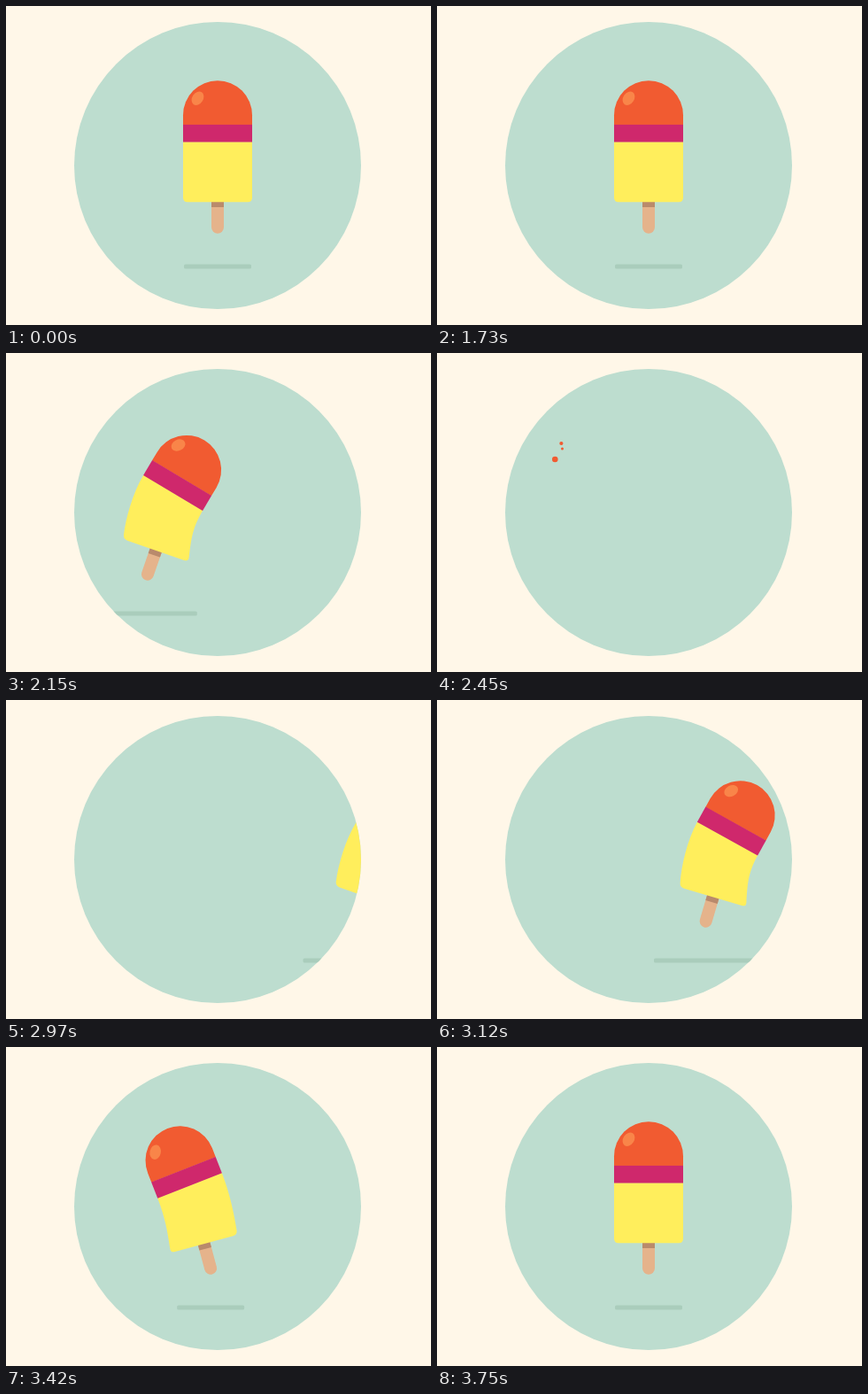
Write an HTML page with a canvas that moves like this. It is 480 px wide and 360 px high and loops after 3840 ms.

```html
<!DOCTYPE html>
<html lang="en">
<head>
<meta charset="utf-8">
<title>Dashing ice lolly</title>
<style>
  html, body { margin: 0; width: 100%; height: 100%; overflow: hidden; background: #fff7e8; }
  canvas { display: block; width: 480px; height: 360px; }
</style>
</head>
<body>
<canvas id="stage" width="480" height="360"></canvas>
<script>
const ctx = document.getElementById('stage').getContext('2d');
const LOOP = 3840, STEP = 30, LEAVE = 1730, ENTER = 2940, REST = 3750;
const COLOR = {
  paper: '#fff7e8', disc: '#bdddcf', shade: '#aacdbc',
  orange: '#f15b31', shine: '#f98549', pink: '#cf286c', yellow: '#ffee5c',
  wood: '#e5b38b', woodDark: '#b98a6c'
};
const rad = Math.PI / 180;

// Smooth curve through [time, value] keys, without overshoot.
function track(keys) {
  const slope = i => (keys[i + 1][1] - keys[i][1]) / (keys[i + 1][0] - keys[i][0]);
  const tangent = i => {
    if (i === 0 || i === keys.length - 1) return 0;
    const a = slope(i - 1), b = slope(i);
    return a * b <= 0 ? 0 : 2 * a * b / (a + b);
  };
  return t => {
    const last = keys.length - 1;
    if (t <= keys[0][0]) return keys[0][1];
    if (t >= keys[last][0]) return keys[last][1];
    let i = 0;
    while (t >= keys[i + 1][0]) i++;
    const [t0, v0] = keys[i], [t1, v1] = keys[i + 1];
    const d = t1 - t0, u = (t - t0) / d, u2 = u * u, u3 = u2 * u;
    return v0 * (2 * u3 - 3 * u2 + 1) + v1 * (3 * u2 - 2 * u3)
      + d * (tangent(i) * (u3 - 2 * u2 + u) + tangent(i + 1) * (u3 - u2));
  };
}

const lean = track([[1730, 0], [1850, 8.5], [1960, 17.5], [2000, 17], [2240, 20], [2900, 20],
  [3120, 16.5], [3240, -3.5], [3450, -17], [3530, -23], [3750, 0]]);
const headLean = track([[1730, 0], [1850, 10], [1960, 22.5], [2000, 22], [2160, 31], [2900, 32],
  [3120, 29], [3240, 4.5], [3450, -25], [3530, -33], [3750, 0]]);
const arrive = track([[2880, 500], [2910, 460], [2940, 424], [3120, 303.5], [3240, 257.5],
  [3400, 232], [3520, 229], [3750, 239]]);
const shadeLeft = track([[1900, 38], [2000, 36.5], [2150, 56], [2240, 64], [2940, 64],
  [3120, 58.5], [3240, 55.5], [3380, 38]]);
const shadeRight = track([[1900, 38], [2000, 40], [2150, 56], [2240, 64], [2940, 64],
  [3120, 58], [3240, 45.5], [3380, 38]]);

function footX(t) {
  if (t < LEAVE) return 239;
  if (t < ENTER - STEP) return 239 - 270 * (2 ** (10 * ((t - LEAVE) / 510 - 1)) - 2 ** -10);
  return arrive(t);
}

// Point reached from p by going "side" across and "up" along a leaning axis.
function along(p, angle, up, side = 0) {
  const s = Math.sin(angle * rad), c = Math.cos(angle * rad);
  return { x: p.x + up * s + side * c, y: p.y - up * c + side * s };
}

function local(p, angle, draw) {
  ctx.save();
  ctx.translate(p.x, p.y);
  ctx.rotate(angle * rad);
  draw();
  ctx.restore();
}

function box(color, x, y, w, h) {
  ctx.fillStyle = color;
  ctx.fillRect(x, y, w, h);
}

function drawStick(base, angle) {
  local(base, angle, () => {
    ctx.fillStyle = COLOR.wood;
    ctx.beginPath();
    ctx.moveTo(-7, -3);
    ctx.lineTo(7, -3);
    ctx.lineTo(7, 28.5);
    ctx.arc(0, 28.5, 7, 0, Math.PI);
    ctx.fill();
    box(COLOR.woodDark, -7, -3, 14, 8.8);
  });
}

function drawBody(base, neck, a, b) {
  const low = 2 * a - b, R = 39, corner = 5;
  const leftLow = along(base, a, 0, -R), rightLow = along(base, a, 0, R);
  const leftTop = along(neck, b, 0, -R), rightTop = along(neck, b, 0, R);
  const curve = (c1, c2, p) => ctx.bezierCurveTo(c1.x, c1.y, c2.x, c2.y, p.x, p.y);
  const round = (c, p) => ctx.quadraticCurveTo(c.x, c.y, p.x, p.y);
  const rightEdge = along(rightLow, low, corner), leftEdge = along(leftLow, low, corner);
  const rightFlat = along(base, a, 0, R - corner), leftFlat = along(base, a, 0, corner - R);
  ctx.fillStyle = COLOR.yellow;
  ctx.beginPath();
  ctx.moveTo(leftTop.x, leftTop.y);
  ctx.lineTo(rightTop.x, rightTop.y);
  curve(along(rightTop, b, -24), along(rightLow, low, 24), rightEdge);
  round(rightLow, rightFlat);
  ctx.lineTo(leftFlat.x, leftFlat.y);
  round(leftLow, leftEdge);
  curve(along(leftLow, low, 24), along(leftTop, b, -24), leftTop);
  ctx.fill();
}

function drawHead(neck, angle) {
  local(neck, angle, () => {
    ctx.fillStyle = COLOR.orange;
    ctx.beginPath();
    ctx.arc(0, -30, 39, Math.PI, 0);
    ctx.lineTo(39, -19);
    ctx.lineTo(-39, -19);
    ctx.fill();
    box(COLOR.pink, -39, -19.3, 78, 19.6);
    ctx.fillStyle = COLOR.shine;
    ctx.beginPath();
    ctx.ellipse(-22.5, -49, 6.2, 8.3, 33 * rad, 0, 2 * Math.PI);
    ctx.fill();
  });
}

function drawLolly(t) {
  const x = footX(t), a = lean(t), b = headLean(t);
  const left = x - shadeLeft(t), right = x + shadeRight(t);
  ctx.fillStyle = COLOR.shade;
  ctx.beginPath();
  ctx.roundRect(left, 291.6, right - left, 4.8, 1.5);
  ctx.fill();

  const base = along({ x, y: 250 }, a, 28.8);
  const neck = along(base, a - 0.2 * (b - a), 68);
  drawStick(base, a);
  drawBody(base, neck, a, b);
  drawHead(neck, b);
}

const streaks = [
  [312, 340, 107.8, 'orange'], [303, 334, 120, 'orange'], [317, 343, 144, 'pink'],
  [317, 343, 180, 'yellow'], [312, 340, 204.2, 'yellow']
];

// Streaks are longest at the peak time and slide left while they shrink.
function drawStreaks(t, peak, offset) {
  const dt = t - peak;
  const size = dt < 0 ? 1 + dt / 75 : 1 - dt / 135;
  if (size <= 0) return;
  ctx.lineWidth = 1.6;
  for (const [x0, x1, y, color] of streaks) {
    const mid = (x0 + x1) / 2 + offset - dt * 0.3, half = (x1 - x0) / 2 * size;
    ctx.strokeStyle = COLOR[color];
    ctx.beginPath();
    ctx.moveTo(mid - half, y);
    ctx.lineTo(mid + half, y);
    ctx.stroke();
  }
}

const drops = [[133.3, 120, 3.3], [140.4, 102, 2.1], [141.5, 108, 1.5]];
const dropSize = track([[2240, 0], [2330, 1.1], [2450, 1], [2690, 0]]);

function drawDrops(t) {
  const size = dropSize(t);
  if (size <= 0) return;
  const dt = t - 2450;
  ctx.fillStyle = COLOR.orange;
  for (const [x, y, r] of drops) {
    ctx.beginPath();
    ctx.arc(x - dt * 0.04, y + dt * 0.008, r * size, 0, 2 * Math.PI);
    ctx.fill();
  }
}

function draw(t) {
  box(COLOR.paper, 0, 0, 480, 360);
  ctx.save();
  ctx.beginPath();
  ctx.arc(239, 180, 162, 0, 2 * Math.PI);
  ctx.fillStyle = COLOR.disc;
  ctx.fill();
  ctx.clip();
  if (t < 2240 || t >= ENTER) drawLolly(t);
  drawStreaks(t, 2240, -73);
  drawStreaks(t, 3240, 0);
  drawDrops(t);
  ctx.restore();
}

// The motion advances in even steps, counted from the start of each dash.
function stepped(t) {
  if (t < LEAVE) return 0;
  if (t >= REST) return REST;
  const from = t < ENTER ? LEAVE : ENTER;
  return from + Math.floor((t - from) / STEP) * STEP;
}

const start = performance.now();
function tick() {
  draw(stepped((performance.now() - start) % LOOP));
  requestAnimationFrame(tick);
}
tick();
</script>
</body>
</html>
```
